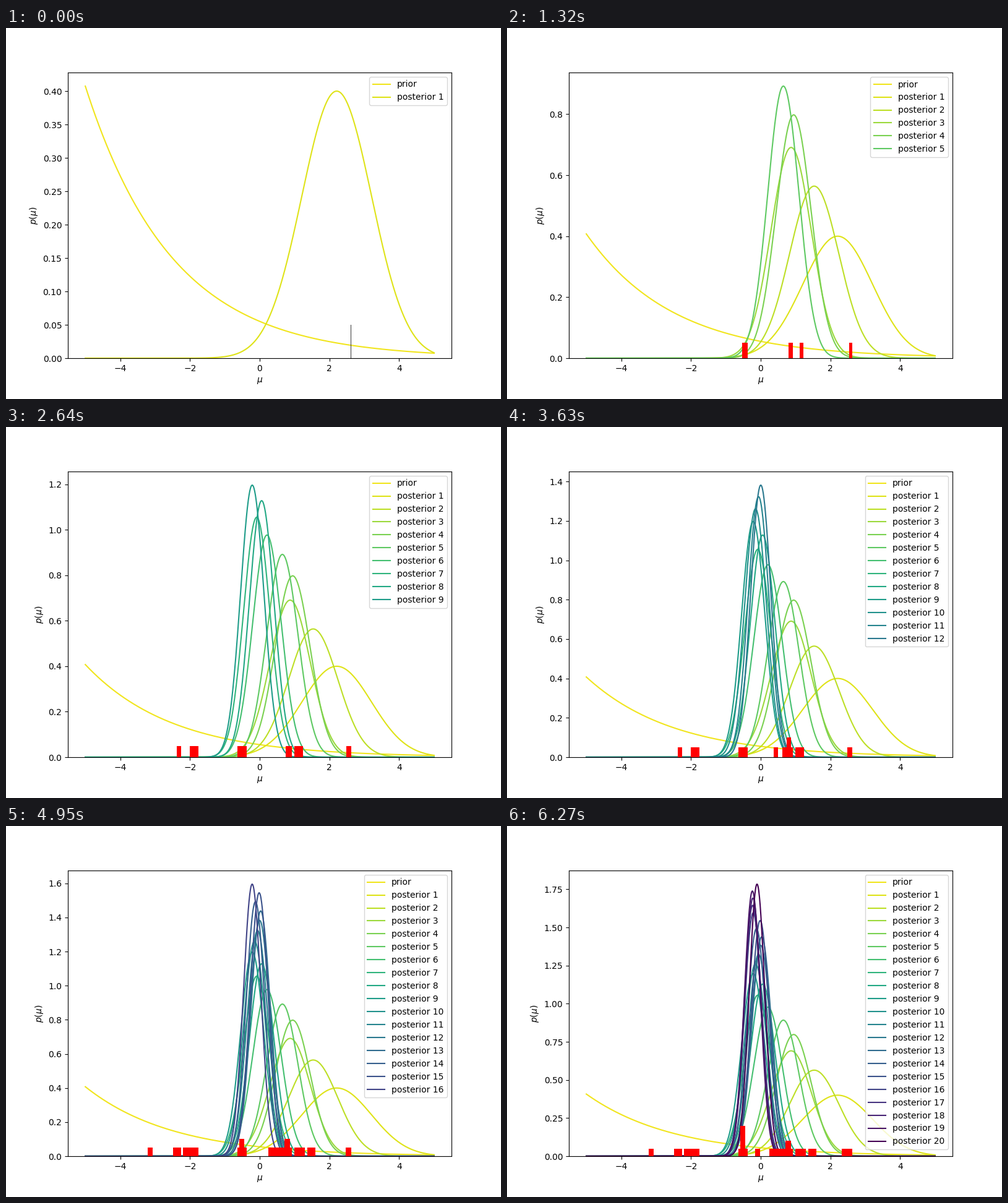
A matplotlib script for the animation above (6600 ms loop, 800 by 600 pixels).

```python
import numpy as np
import matplotlib.pyplot as plt
from matplotlib.animation import FuncAnimation

RATE = 0.4      # decay of the exponential prior
BINS = 40
UNIT = 0.05     # height of one observation in the histogram
SAMPLES = np.array([
    2.608, 0.86, -0.45, 1.165, -0.533, -2.0, -1.85, 1.05, -2.377, 0.45,
    0.80, 0.71, 0.34, -2.08, 1.475, -3.212, -0.50, -0.08, -0.50, 2.42,
])
COUNT = len(SAMPLES)

mu = np.linspace(-5, 5, 1000)
step = mu[1] - mu[0]


def density(n):
    """Belief about mu after n unit-variance observations."""
    log_p = -RATE * mu - 0.5 * n * mu**2 + mu * SAMPLES[:n].sum()
    p = np.exp(log_p - log_p.max())
    return p / (step * (p.sum() - 0.5 * (p[0] + p[-1])))


def bars(n):
    """Left edges, heights and width of the filled histogram bins."""
    if n == 1:
        return SAMPLES[:1], np.array([UNIT]), 1 / BINS
    counts, edges = np.histogram(SAMPLES[:n], bins=BINS)
    full = counts > 0
    return edges[:-1][full], counts[full] * UNIT, edges[1] - edges[0]


def shade(n):
    return plt.cm.viridis(0.98 if n == 0 else 1 - n / COUNT)


curves = [density(n) for n in range(COUNT + 1)]
hists = [bars(n) for n in range(1, COUNT + 1)]

fig, ax = plt.subplots(figsize=(8, 6), dpi=100)


def draw(frame):
    last = frame + 1
    ax.clear()
    for n in range(last + 1):
        label = f"posterior {n}" if n else "prior"
        ax.plot(mu, curves[n], color=shade(n), label=label)
    # bars of earlier steps stay on the axes
    color = "red" if frame else "#3a3a3a"
    for left, height, width in hists[:last]:
        ax.bar(left, height, width, align="edge", color=color, zorder=2.2)
    ax.set_xlim(-5.5, 5.5)
    ax.set_ylim(0, 1.05 * max(c.max() for c in curves[:last + 1]))
    ax.set_xlabel(r"$\mu$")
    ax.set_ylabel(r"$p(\mu)$")
    ax.legend(loc="upper right")
    return []


anim = FuncAnimation(fig, draw, frames=COUNT, interval=330, repeat=True,
                     repeat_delay=0, blit=False)
plt.show()
```
